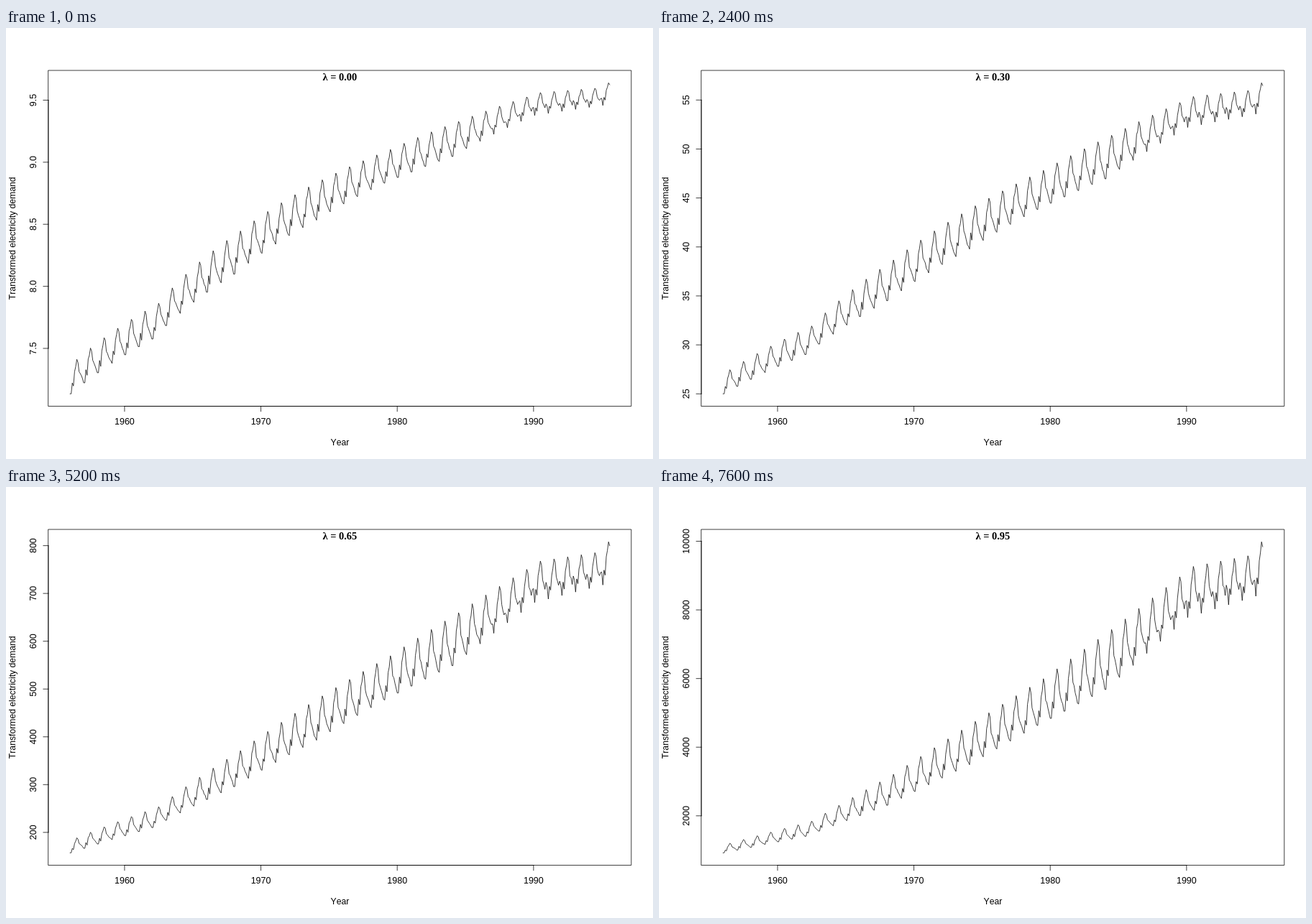
Animation of 900 by 600 pixels, one loop 8000 ms. Source, as an HTML page:

```html
<!DOCTYPE html>
<html lang="en">
<head>
<meta charset="utf-8">
<title>Power transform of monthly demand</title>
<style>
  html, body { margin: 0; width: 100%; height: 100%; overflow: hidden; background: #fff; }
  svg { display: block; width: 900px; height: 600px; }
  text { font: 12.2px "Liberation Sans", Arial, sans-serif; font-kerning: none; text-anchor: middle; fill: #000; }
  .num { font-size: 12.5px; }
  #title { font: bold 14.4px "Liberation Serif", "Times New Roman", serif; }
  path, rect, polyline { fill: none; stroke: #000; stroke-width: 0.75; stroke-linecap: round; stroke-linejoin: round; }
</style>
</head>
<body>
<svg viewBox="0 0 900 600">
  <rect x="59.04" y="59.04" width="810.72" height="467.52"/>
  <g id="xAxis"></g>
  <g id="yAxis"></g>
  <polyline id="series"/>
  <text id="title" x="464.4" y="73"></text>
  <text x="464.4" y="581">Year</text>
  <text transform="translate(13 292.8) rotate(-90)">Transformed electricity demand</text>
</svg>
<script>
const STEP = 400, STEPS = 20, START = 1956, MONTHS = 476, TICK = 7.2;
const BOX = { left: 59.04, right: 869.76, top: 59.04, bottom: 526.56 };

// Key points of the trend: year, summer low, winter high
const TREND = [
  [1956, 1254, 1655], [1962, 1950, 2600], [1968, 3290, 4655],
  [1974, 5080, 7030], [1979, 6840, 8980], [1984, 8480, 11250],
  [1990, 11810, 14200], [1994, 12600, 14700], [1995, 12805, 15358]
];
// Share of the way from low to high, January to December
const SEASON = [0.02, 0, 0.32, 0.2, 0.62, 0.77, 1, 0.88, 0.46, 0.37, 0.25, 0.14];

const byId = id => document.getElementById(id);
const mix = (a, b, t) => a + (b - a) * t;
const clamp = v => Math.min(1, Math.max(0, v));
const scale = (v, a, b, p, q) => mix(p, q, (v - a) / (b - a));
const boxCox = (v, k) => k ? (v ** k - 1) / k : Math.log(v);

function noise(i) {
  const n = Math.sin(i * 12.9898) * 43758.5453;
  return n - Math.floor(n) - 0.5;
}

function trend(year, column) {
  const next = Math.max(1, TREND.findIndex(p => p[0] >= year));
  const a = TREND[next - 1], b = TREND[next];
  return mix(a[column], b[column], (year - a[0]) / (b[0] - a[0]));
}

function demandAt(i) {
  const year = START + Math.floor(i / 12), m = i % 12;
  const low = trend(m < 7 ? year : Math.min(1995, year + 1), 1);
  let part = SEASON[m];
  if (m % 11 === 0) part += 0.28 * clamp((year - 1984) / 6); // later summers add a second peak
  if (part > 0 && part < 1) part = clamp(part + 0.08 * noise(i));
  return mix(low, trend(year, 2), part);
}

const demand = Array.from({ length: MONTHS }, (_, i) => demandAt(i));

const padX = (BOX.right - BOX.left) / 27;
const padY = (BOX.bottom - BOX.top) / 27;
const xAt = year => scale(year, START, START + (MONTHS - 1) / 12, BOX.left + padX, BOX.right - padX);

// Round tick spacing for about five intervals
function tickUnit(range) {
  const cell = range / 5, base = 10 ** Math.floor(Math.log10(cell));
  let unit = base;
  for (const [f, bias] of [[2, 0.8], [5, 1.7], [10, 0.8]]) {
    if (f * base - cell >= bias * (cell - unit)) break;
    unit = f * base;
  }
  return unit;
}

function drawXAxis() {
  const years = [1960, 1970, 1980, 1990];
  let out = `<path d="M${xAt(1960)} ${BOX.bottom}H${xAt(1990)}"/>`;
  for (const year of years) {
    const x = xAt(year);
    out += `<path d="M${x} ${BOX.bottom}v${TICK}"/><text class="num" x="${x}" y="552">${year}</text>`;
  }
  byId("xAxis").innerHTML = out;
}

function drawYAxis(low, high, yAt) {
  const pad = (high - low) * 0.04;
  const unit = tickUnit(high - low + 2 * pad);
  const first = Math.ceil((low - pad) / unit), last = Math.floor((high + pad) / unit);
  let out = `<path d="M${BOX.left} ${yAt(first * unit)}V${yAt(last * unit)}"/>`;
  for (let n = first; n <= last; n++) {
    const y = yAt(n * unit), label = (n * unit).toFixed(unit < 1 ? 1 : 0);
    out += `<path d="M${BOX.left} ${y}h${-TICK}"/>` +
      `<text class="num" transform="translate(42 ${y}) rotate(-90)">${label}</text>`;
  }
  byId("yAxis").innerHTML = out;
}

function draw(step) {
  const k = step * 0.05;
  const values = demand.map(v => boxCox(v, k));
  const low = Math.min(...values), high = Math.max(...values);
  const yAt = v => scale(v, low, high, BOX.bottom - padY, BOX.top + padY);
  byId("series").setAttribute("points",
    values.map((v, i) => `${xAt(START + i / 12).toFixed(2)},${yAt(v).toFixed(2)}`).join(" "));
  byId("title").textContent = `λ = ${k.toFixed(2)}`;
  drawYAxis(low, high, yAt);
}

let shown = 0;
const began = performance.now();
function tick(now) {
  const step = Math.floor(Math.max(0, now - began) / STEP) % STEPS;
  if (step !== shown) draw(shown = step);
  requestAnimationFrame(tick);
}
drawXAxis();
draw(0);
requestAnimationFrame(tick);
</script>
</body>
</html>
```
